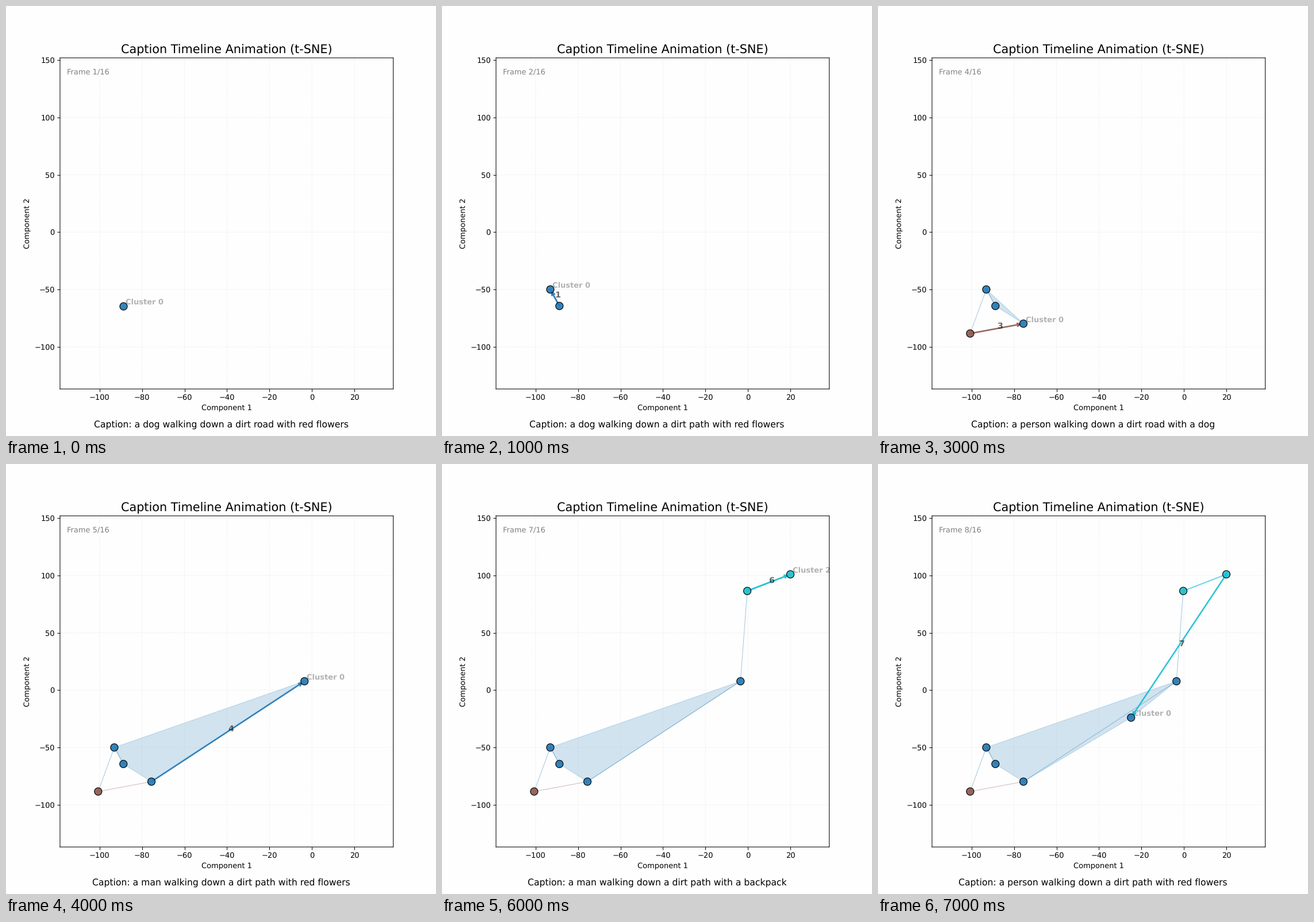
Animation, 748 px wide and 748 px high, one loop 8 s. Source, as a matplotlib script:

```python
import numpy as np
import matplotlib.pyplot as plt
from matplotlib.animation import FuncAnimation

# Soft, unsnapped lines and natural letter widths.
plt.rcParams.update({
    "font.family": "DejaVu Sans",
    "text.hinting": "no_hinting",
    "path.snap": False,
})

TOTAL = 16
POINTS = np.array([
    (-88.8, -64.4), (-93.1, -50.0), (-100.7, -88.4), (-75.6, -79.8),
    (-3.5, 7.7), (-0.3, 86.4), (20.0, 100.9), (-24.9, -24.0),
])
CLUSTERS = np.array([0, 0, 1, 0, 0, 2, 2, 0])
COLORS = ["#1f77b4", "#8c564b", "#17becf"]
CAPTIONS = [
    "a dog walking down a dirt road with red flowers",
    "a dog walking down a dirt path with red flowers",
    "a black cat walking down a dirt path",
    "a person walking down a dirt road with a dog",
    "a man walking down a dirt path with red flowers",
    "a man walking down a dirt path with a backpack",
    "a man walking down a dirt path with a backpack",
    "a person walking down a dirt path with red flowers",
]

fig = plt.figure(figsize=(8, 8), dpi=93.5, facecolor="#fefefe")
nudge = 0.5 / 800
ax = fig.add_axes([0.125 + nudge, 0.11 - nudge, 0.775, 0.77], facecolor="#fefefe")
ax.set_xlim(-118.67, 38.33)
ax.set_ylim(-136.74, 151.86)
ax.set_title("Caption Timeline Animation (t-SNE)", fontsize=16)
ax.set_xlabel("Component 1")
ax.set_ylabel("Component 2")
ax.grid(True, linestyle=":", alpha=0.3)

counter = ax.text(0.02, 0.95, "", transform=ax.transAxes, color="gray")
caption = fig.text(0.5, 0.02, "", ha="center", fontsize=12)
parts = []


def around_center(pts):
    """Order points in convex position by angle around their mean."""
    d = pts - pts.mean(axis=0)
    return pts[np.argsort(np.arctan2(d[:, 1], d[:, 0]))]


def draw_groups(n):
    for c, color in enumerate(COLORS):
        pts = POINTS[:n][CLUSTERS[:n] == c]
        if len(pts) > 2:
            parts.extend(ax.fill(*around_center(pts).T, color=color, alpha=0.2))
        elif len(pts) == 2:
            parts.extend(ax.plot(*pts.T, color=color, lw=2, alpha=0.4, zorder=1.2))


def draw_step(i):
    start, end = POINTS[i - 1], POINTS[i]
    parts.append(ax.annotate(
        "", xy=end, xytext=start, zorder=3,
        arrowprops=dict(arrowstyle="->", lw=2, alpha=0.9,
                        color=COLORS[CLUSTERS[i - 1]])))
    parts.append(ax.text(*(start + end) / 2, str(i), fontsize=11,
                         weight="bold", color="black", alpha=0.6, zorder=4))


def update(i):
    while parts:
        parts.pop().remove()
    n = i + 1
    colors = [COLORS[c] for c in CLUSTERS[:n]]

    draw_groups(n)
    for k in range(i - 1):
        parts.extend(ax.plot(*POINTS[k:k + 2].T, color=colors[k],
                             lw=0.8, alpha=0.4, zorder=1.5))
    parts.append(ax.text(*(POINTS[i] + 1), f"Cluster {CLUSTERS[i]}",
                         weight="bold", color="gray", alpha=0.6, zorder=2.5))
    if i:
        draw_step(i)
    parts.append(ax.scatter(*POINTS[:n].T, s=100, c=colors, edgecolors="black",
                            linewidths=1, alpha=0.9, zorder=5))

    counter.set_text(f"Frame {n}/{TOTAL}")
    caption.set_text("Caption: " + CAPTIONS[i])
    return parts


anim = FuncAnimation(fig, update, frames=len(POINTS), interval=1000,
                     init_func=lambda: [], repeat=True, repeat_delay=0)
plt.show()
```
